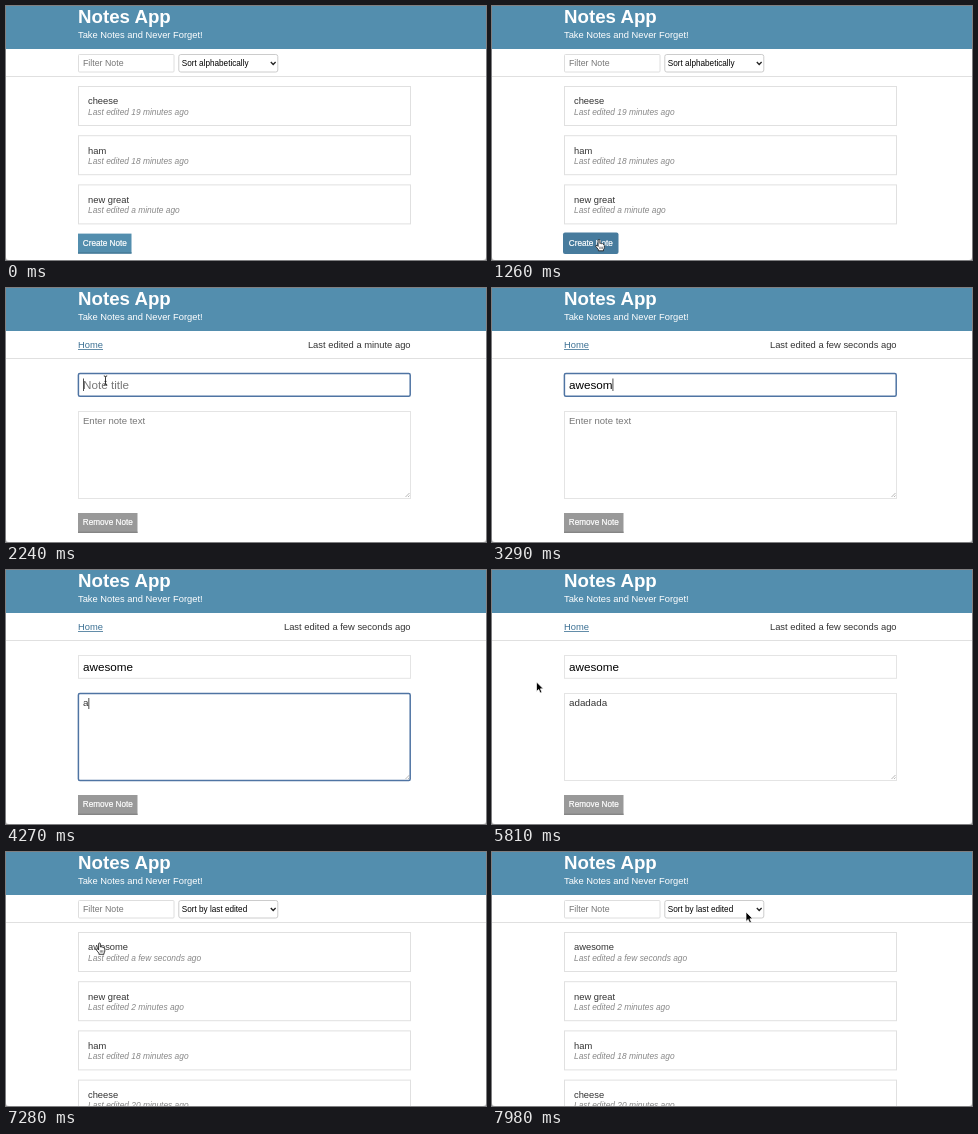
These frames come from a looping animation (480x254 px, 8000 ms). An HTML page:

```html
<!DOCTYPE html>
<html lang="en">
<head>
<meta charset="utf-8">
<title>Notes App</title>
<style>
  html, body { margin: 0; width: 100%; height: 100%; overflow: hidden; background: #fff; }
  svg { display: block; width: 100%; height: 100%; }
  text { font-family: "Liberation Sans", Arial, sans-serif; }
</style>
</head>
<body>
<svg id="stage" viewBox="0 0 480 254">
  <rect width="480" height="254" fill="#fff"/>
  <rect width="480" height="43" fill="#538eae"/>
  <text x="72" y="17" font-size="18.7" font-weight="700" fill="#fff">Notes App</text>
  <text x="72" y="31.6" font-size="9.35" fill="#fff">Take Notes and Never Forget!</text>
  <rect y="70" width="480" height="1" fill="#e0e0e0"/>
  <g id="page"></g>
  <path d="M0 251V254H3Q0 254 0 251ZM480 251V254H477Q480 254 480 251Z" fill="#bbb"/>
  <g id="pointer"></g>
</svg>
<script>
const LOOP = 8000, STEP = 70;
const OPEN_EDITOR = 1400, FOCUS_TITLE = 2170, FIRST_KEY = 2310,
      FOCUS_BODY = 3710, BLUR = 5670, GO_HOME = 6790;
const page = document.getElementById('page');
const pointer = document.getElementById('pointer');

// Pointer paths: [time, x, y]; hidden between them
const PATHS = [
  [[70, 176, 248], [210, 172, 150], [350, 150, 40], [420, 132, 11], [560, 86, 60],
   [700, 78, 150], [840, 104, 215], [980, 105, 229], [1260, 107, 233.5], [1400, 107, 233.5],
   [1610, 106, 200], [1890, 102, 125], [2100, 99.5, 95], [2240, 99.5, 92.5]],
  [[5250, 99.5, 92.5], [5390, 76, 100], [5530, 46, 109], [5600, 36, 111], [5740, 41, 112],
   [5810, 44.5, 112], [5880, 44.5, 112], [6090, 58, 78], [6230, 84, 40], [6370, 72, 48],
   [6510, 62, 64], [6580, 62, 64], [6650, 80.5, 57], [7140, 80.5, 57], [7350, 100, 108],
   [7490, 118, 130], [7630, 165, 82], [7770, 218, 10], [7910, 250, 50], [7980, 254, 60]]
];
const TITLE_KEYS = [2310, 2520, 2660, 2870, 3220, 3290, 3500];
const BODY_KEYS = [4270, 4550, 4690, 4760, 4900, 4970, 5110];

const text = (s, x, y, size, fill, extra = '') =>
  `<text x="${x}" y="${y}" font-size="${size}" fill="${fill}" ${extra}>${s}</text>`;
const box = (x, y, w, h, stroke, width = 1, r = 0) =>
  `<rect x="${x}" y="${y}" width="${w}" height="${h}" rx="${r}" fill="#fff" stroke="${stroke}" stroke-width="${width}"/>`;
const typed = (word, keys, t) => word.slice(0, keys.filter(k => k <= t).length);
const inside = (p, x0, y0, x1, y1) => p && p[0] >= x0 && p[0] <= x1 && p[1] >= y0 && p[1] <= y1;

function pointerAt(t) {
  const path = PATHS.find(p => t >= p[0][0] && t <= p[p.length - 1][0]);
  if (!path) return null;
  const i = Math.max(1, path.findIndex(k => k[0] >= t));
  const [t0, x0, y0] = path[i - 1], [t1, x1, y1] = path[i];
  const u = (t - t0) / (t1 - t0);
  return [x0 + (x1 - x0) * u, y0 + (y1 - y0) * u];
}

function button(label, y, w, fill, edge, ring) {
  const shape = ring
    ? `<rect x="71" y="${y - 1}" width="${w + 2}" height="21.5" rx="2" fill="${fill}"/>`
    : `<rect x="72" y="${y}" width="${w}" height="20" fill="${fill}"/>
       <rect x="72" y="${y + 18.6}" width="${w}" height="1.4" fill="${edge}"/>`;
  return shape + text(label, 76.8, y + 12.3, 8.19, '#fff', 'stroke="#fff" stroke-width=".2"');
}

function listPage(notes, sort, t, p) {
  const cards = notes.map(([title, age], i) => {
    const y = 80.5 + i * 49.2;
    return box(72.5, y, 332, 39, '#e0e0e0') +
      text(title, 82, y + 17.8, 9.35, '#333') +
      text(`Last edited ${age} ago`, 82, y + 28, 8.4, '#888', 'font-style="italic"');
  });
  const hover = inside(p, 72, 226, 125, 247);
  return box(72.5, 48.5, 95.5, 17.5, '#dedede', 1, 1) +
    text('Filter Note', 77, 60.2, 8.8, '#777') +
    box(172.8, 48.5, 99, 17.5, '#ccc', 1, 2) +
    text(sort, 175.8, 60, 8.19, '#000') +
    '<path d="M264.8 56l2.4 2.5 2.4-2.5" fill="none" stroke="#222" stroke-width="1.3"/>' +
    cards.join('') +
    button('Create Note', 80 + notes.length * 49.2, 53.5, hover ? '#477b9d' : '#538eae',
      hover ? '#3f6f8e' : '#467a97', hover && t >= 1190);
}

function editorPage(t, p) {
  const title = typed('awesome', TITLE_KEYS, t), body = typed('adadada', BODY_KEYS, t);
  const onTitle = t >= FOCUS_TITLE && t < FOCUS_BODY;
  const onBody = t >= FOCUS_BODY && t < BLUR;
  const field = (y, h, on) => on
    ? box(72.4, y, 331.8, h, '#4f74a3', 1.5, 1.5)
    : box(72.5, y, 332, h, '#e4e4e4');
  const age = t < FIRST_KEY ? 'a minute' : 'a few seconds';
  const hover = inside(p, 72, 225, 131, 244);
  return text('Home', 72, 59.8, 9.35, '#3d7194') +
    '<rect x="72" y="61" width="25" height=".8" fill="#3d7194"/>' +
    text(`Last edited ${age} ago`, 404.6, 59.8, 9.4, '#333', 'text-anchor="end"') +
    field(85.5, 22.8, onTitle) +
    text(title || 'Note title', 77, 100.8, 11.7, title ? '#000' : '#777', 'id="title"') +
    field(123.5, 87, onBody) +
    text(body || 'Enter note text', 77, 136.4, body ? 9.8 : 9.55, body ? '#333' : '#777', 'id="body"') +
    '<path d="M399.5 209l4-4M402 209l1.5-1.5" stroke="#999" stroke-width=".7"/>' +
    button('Remove Note', 225, 59.5, hover ? '#888' : '#999', hover ? '#777' : '#858585');
}

function addCaret(t) {
  const onTitle = t > FOCUS_TITLE && t < FOCUS_BODY, onBody = t >= FOCUS_BODY && t < BLUR;
  if (!onTitle && !onBody) return;
  const started = onTitle ? t >= TITLE_KEYS[0] : t >= BODY_KEYS[0];
  const node = document.getElementById(onTitle ? 'title' : 'body');
  const x = 77 + (started ? node.getComputedTextLength() : 0);
  const [y, h] = onTitle ? [90.5, 12.5] : [128, 11];
  page.insertAdjacentHTML('beforeend',
    `<rect x="${x}" y="${y}" width=".8" height="${h}" fill="#222"/>`);
}

const SHAPES = {
  arrow: '<path d="M0 0V9.4L2.2 7.4 3.7 10.9 5.4 10.2 3.9 6.8H6.8Z" fill="#000" stroke="#fff" stroke-width=".7"/>',
  beam: '<path d="M-1.7-4.6Q0-4.6 0-3.4Q0-4.6 1.7-4.6M0-3.4V3.4M-1.7 4.6Q0 4.6 0 3.4Q0 4.6 1.7 4.6M-1 .9H1" fill="none" stroke="#222" stroke-width=".9"/>',
  hand: '<path d="M-.9.9Q-.9 0 0 0T.9.9V4Q1.8 3.3 2.5 4.2Q3.5 3.7 4 4.7Q5.3 4.5 5.3 6V8Q5.2 9.3 4.5 10V11.3H-.6V10.2L-3.2 6.9Q-3.4 5.5-2 5.8L-.9 6.9Z" fill="#fff" stroke="#111" stroke-width=".8"/>' +
    '<path d="M.8 7.2V9.6M2.1 7.2V9.6M3.4 7.2V9.6" stroke="#111" stroke-width=".5"/>'
};

function pointerShape(t, p, editing) {
  if (editing) {
    if (inside(p, 72, 85, 404, 108) || inside(p, 72, 123, 404, 210)) return 'beam';
    return inside(p, 72, 50, 97, 63) || inside(p, 72, 225, 131, 244) ? 'hand' : 'arrow';
  }
  if (t >= GO_HOME && t < 7210) return 'hand';
  if (inside(p, 72, 48, 168, 66)) return 'beam';
  const onCard = p[1] >= 80 && p[1] < 218 && (p[1] - 80) % 49.2 < 39 && inside(p, 72, 80, 404, 218);
  return onCard || inside(p, 72, 226, 125, 247) ? 'hand' : 'arrow';
}

function draw(t) {
  const p = pointerAt(t), editing = t >= OPEN_EDITOR && t < GO_HOME;
  if (editing) {
    page.innerHTML = editorPage(t, p);
    addCaret(t);
  } else if (t < OPEN_EDITOR) {
    page.innerHTML = listPage([['cheese', '19 minutes'], ['ham', '18 minutes'],
      ['new great', 'a minute']], 'Sort alphabetically', t, p);
  } else {
    page.innerHTML = listPage([['awesome', 'a few seconds'], ['new great', '2 minutes'],
      ['ham', '18 minutes'], ['cheese', '20 minutes']], 'Sort by last edited', t, p);
  }
  pointer.innerHTML = p
    ? `<g transform="translate(${p[0]} ${p[1]})">${SHAPES[pointerShape(t, p, editing)]}</g>` : '';
}

let shown = -1;
function tick() {
  const t = Math.floor(performance.now() % LOOP / STEP) * STEP;
  if (t !== shown) draw(shown = t);
  requestAnimationFrame(tick);
}
tick();
</script>
</body>
</html>
```
